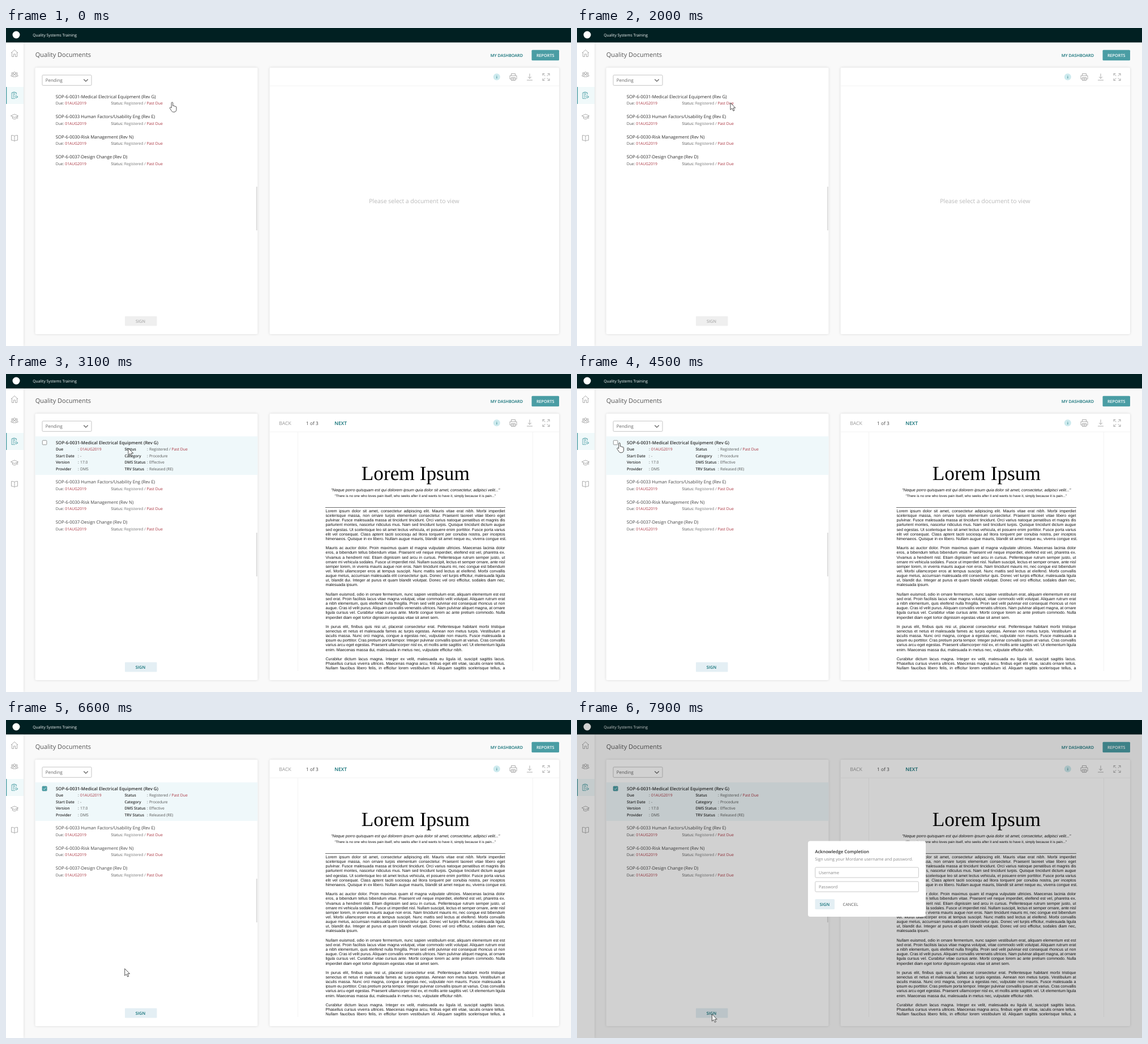
These frames come from a looping animation (998x561 px, 8000 ms). An HTML page:

```html
<!DOCTYPE html>
<html lang="en">
<head>
<meta charset="utf-8">
<title>Quality Documents</title>
<style>
  html, body { margin: 0; width: 100%; height: 100%; overflow: hidden; background: #f9f9f9; }
  svg { display: block; width: 998px; height: 561px; }
  text { font-family: "Open Sans", sans-serif; text-rendering: geometricPrecision; }
  .sans { font-family: "Liberation Sans", sans-serif; }
  .serif { font-family: "Liberation Serif", serif; }
  .card { fill: #fff; filter: drop-shadow(0 0 2px #0002); }
  .icon { fill: none; stroke: #999; stroke-width: .8; stroke-linejoin: round; }
</style>
</head>
<body>
<svg id="stage" viewBox="0 0 998 561"></svg>
<script>
const TEAL = '#4a9da4', DARK_TEAL = '#0d6e75', RED = '#a8323e', INK = '#2b2b2b', GREY = '#777';

// Text placed by its left edge and the middle of its capitals.
const text = (x, cy, size, fill, content, attrs = '') =>
  `<text x="${x}" y="${cy + size * .36}" font-size="${size}" fill="${fill}" ${attrs}>${content}</text>`;
const bold = (x, cy, size, fill, content, attrs = '') =>
  text(x, cy, size, fill, content, 'font-weight="600" ' + attrs);
const rect = (x, y, w, h, fill, attrs = '') =>
  `<rect x="${x}" y="${y}" width="${w}" height="${h}" fill="${fill}" ${attrs}/>`;
const span = (fill, content) => `<tspan fill="${fill}">${content}</tspan>`;
const icon = (x, y, d, attrs = '') =>
  `<path class="icon" transform="translate(${x} ${y})" d="${d}" ${attrs}/>`;
const group = (id, content) => `<g id="${id}">${content}</g>`;

const documents = [
  'SOP-6-0031-Medical Electrical Equipment (Rev G)',
  'SOP-6-0033 Human Factors/Usability Eng (Rev E)',
  'SOP-6-0030-Risk Management (Rev N)',
  'SOP-6-0037-Design Change (Rev D)'
];

const article = `Lorem ipsum dolor sit amet, consectetur adipiscing elit. Mauris vitae erat nibh. Morbi imperdiet
scelerisque massa, non ornare turpis elementum consectetur. Praesent laoreet vitae libero eget
pulvinar. Fusce malesuada massa at tincidunt tincidunt. Orci varius natoque penatibus et magnis dis
parturient montes, nascetur ridiculus mus. Nam sed tincidunt turpis. Quisque tincidunt dictum augue
sed egestas. Ut scelerisque leo sit amet lectus vehicula, et posuere enim porttitor. Fusce porta varius
elit vel consequat. Class aptent taciti sociosqu ad litora torquent per conubia nostra, per inceptos
himenaeos. Quisque in ex libero. Nullam augue mauris, blandit sit amet neque eu, viverra congue est.

Mauris ac auctor dolor. Proin maximus quam id magna vulputate ultricies. Maecenas lacinia dolor
eros, a bibendum tellus bibendum vitae. Praesent vel neque imperdiet, eleifend est vel, pharetra ex.
Vivamus a hendrerit nisl. Etiam dignissim sed arcu in cursus. Pellentesque rutrum semper justo, ut
ornare mi vehicula sodales. Fusce ut imperdiet nisl. Nullam suscipit, lectus et semper ornare, ante nisl
semper lorem, in viverra mauris augue non eros. Nam tincidunt mauris mi, nec congue est bibendum
vel. Morbi ullamcorper eros at tempus suscipit. Nunc mattis sed lectus at eleifend. Morbi convallis
augue metus, accumsan malesuada elit consectetur quis. Donec vel turpis efficitur, malesuada ligula
ut, blandit dui. Integer at purus et quam blandit volutpat. Donec vel orci efficitur, sodales diam nec,
malesuada ipsum.

Nullam euismod, odio in ornare fermentum, nunc sapien vestibulum erat, aliquam elementum est est
sed erat. Proin facilisis lacus vitae magna volutpat, vitae commodo velit volutpat. Aliquam rutrum erat
a nibh elementum, quis eleifend nulla fringilla. Proin sed velit pulvinar est consequat rhoncus ut non
augue. Cras id velit purus. Aliquam convallis venenatis ultrices. Nam pulvinar aliquet magna, at ornare
ligula cursus vel. Curabitur vitae cursus ante. Morbi congue lorem ac ante pretium commodo. Nulla
imperdiet diam eget tortor dignissim egestas vitae sit amet sem.

In purus elit, finibus quis nisi ut, placerat consectetur erat. Pellentesque habitant morbi tristique
senectus et netus et malesuada fames ac turpis egestas. Aenean non metus turpis. Vestibulum at
iaculis massa. Nunc orci magna, congue a egestas nec, vulputate non mauris. Fusce malesuada a
ipsum eu porttitor. Cras pretium porta tempor. Integer pulvinar convallis ipsum at varius. Cras convallis
varius arcu eget egestas. Praesent ullamcorper nisl ex, et mollis ante sagittis vel. Ut elementum ligula
enim. Maecenas massa dui, malesuada in metus nec, vulputate efficitur nibh.

Curabitur dictum lacus magna. Integer ex velit, malesuada eu ligula id, suscipit sagittis lacus.
Phasellus cursus viverra ultrices. Maecenas magna arcu, finibus eget elit vitae, iaculis ornare tellus.
Nullam faucibus libero felis, in efficitur lorem vestibulum id. Aliquam sagittis scelerisque tellus, a`.

split('\n');

const row = (title, cy, ink) =>
  text(87.7, cy, 7.82, ink, title) +
  text(87.7, cy + 12, 6.82, '#555', 'Due: ' + span(RED, '01AUG2019')) +
  text(185.4, cy + 12, 6.82, '#555', `Status: ${span(GREY, 'Registered /')} ${span(RED, 'Past Due')}`);
const rows = (titles, top, ink) => titles.map((title, i) => row(title, top + i * 35.45, ink)).join('');

const field = (x, colonX, cy, label, value) =>
  bold(x, cy, 6.75, INK, label) + text(colonX, cy, 6.8, INK, ':') + text(colonX + 4, cy, 6.8, '#555', value);

const chrome = () =>
  rect(0, 25, 31, 536, '#fff', 'class="card"') +
  rect(0, 0, 998, 25.5, '#012022') +
  '<circle cx="18" cy="12" r="6.5" fill="#fff"/>' +
  text(47.3, 12.5, 6.8, '#fff', 'Quality Systems Training') +
  rect(0, 104, 31, 30, '#f0f9fa') + rect(0, 104, 1.3, 30, TEAL) +
  icon(9, 38, 'M0 6 6 .5 12 6M1.5 5V12.5H4.5V8H7.5V12.5H10.5V5') +
  icon(9, 77, 'M4 2.5a2 2 0 1 0 4 0a2 2 0 1 0-4 0M3 9V7.5Q3 5.5 6 5.5T9 7.5V9ZM.8 3a1.4 1.4 0 1 0 2.8 0a1.4 1.4 0 1 0-2.8 0M8.4 3a1.4 1.4 0 1 0 2.8 0a1.4 1.4 0 1 0-2.8 0M3 8H0V7Q0 5 2.8 5M9 8H12V7Q12 5 9.2 5') +
  icon(9, 112.5, 'M7 12H1V1.5H3.5M7 1.5H9.5V5M3.5 .5H7V2.7H3.5ZM3 5H7.5M3 7.3H6M3 9.6H5.5M6.5 9 9 6.5V8H11.5V10H9V11.5Z', `style="stroke:${TEAL}"`) +
  icon(8.5, 151, 'M0 4 6.5 1 13 4 6.5 7ZM3 5.5V8.7Q6.5 11 10 8.7V5.5M12 4.5V9') +
  icon(9, 188.5, 'M6 2Q4 .5 .5 .8V9.5Q4 9.3 6 11Q8 9.3 11.5 9.5V.8Q8 .5 6 2V11') +
  text(51.8, 47, 11, '#555', 'Quality Documents') +
  bold(855.7, 48, 7.25, DARK_TEAL, 'MY DASHBOARD') +
  rect(928.5, 38.7, 48.5, 18.6, TEAL, 'rx="1.5"') +
  bold(952.7, 48, 7.25, '#fff', 'REPORTS', 'text-anchor="middle"') +
  rect(51.5, 70, 393, 470, '#fff', 'class="card" rx="2"') +
  rect(465.5, 70, 511.5, 470, '#fff', 'class="card" rx="2"') +
  rect(466, 101.7, 511, .7, '#eee') +
  rect(64, 83, 87, 18.3, '#fff', 'stroke="#b5b5b5" stroke-width=".8" rx="1.5"') +
  text(69.8, 92.3, 7.9, '#666', 'Pending') +
  icon(137, 90, 'M.3 .5 4 4.2 7.7 .5', 'style="stroke:#555;stroke-width:1.1"') +
  rect(442.3, 280, 1.2, 77, '#c9c9c9') +
  '<circle cx="866.8" cy="86.3" r="6" fill="#cdeaee"/>' +
  bold(866.8, 86.3, 6.5, DARK_TEAL, 'i', 'text-anchor="middle"') +
  icon(889.5, 80, 'M3 4V.5H10V4M3 10H.5V4H12.5V10H10M3 7.3H10V12.5H3ZM4.5 9H8.5M4.5 10.8H8.5') +
  icon(919.5, 80, 'M5.5 .5V9M2.5 6.2 5.5 9 8.5 6.2M.5 12H10.5') +
  icon(947.5, 80, 'M5 5 .5 .5M.5 4V.5H4M8 5 12.5 .5M9 .5H12.5V4M5 8 .5 12.5M.5 9V12.5H4M8 8 12.5 12.5M9 12.5H12.5V9');

const emptyView = () =>
  rows(documents, 121, INK) +
  rect(210, 508.5, 56.5, 17, '#efefef', 'rx="1"') +
  text(237.5, 517, 7.3, '#999', 'SIGN', 'text-anchor="middle"') +
  text(721, 305, 10.4, '#b8b8b8', 'Please select a document to view', 'text-anchor="middle"');

const openView = () =>
  rect(51.5, 110, 393, 68, '#eff8fa') +
  rect(64.3, 117.2, 7.6, 7.6, '#fff', 'stroke="#888" stroke-width=".9" rx="1"') +
  group('checked', rect(63.8, 116.7, 8.6, 8.6, TEAL, 'rx="1"') +
    icon(65.5, 118.5, 'M.5 2.7 2 4.3 5 .9', 'style="stroke:#fff"')) +
  bold(88, 121, 7.78, INK, documents[0]) +
  field(88, 127, 133, 'Due', span(RED, '01AUG2019')) +
  field(88, 127, 144.5, 'Start Date', '-') +
  field(88, 127, 156, 'Version', '17.0') +
  field(88, 127, 167.5, 'Provider', 'DMS') +
  field(209.4, 249, 133, 'Status', 'Registered / ' + span(RED, 'Past Due')) +
  field(209.4, 249, 144.5, 'Category', 'Procedure') +
  field(209.4, 249, 156, 'DMS Status', 'Effective') +
  field(209.4, 249, 167.5, 'TRV Status', 'Released (RE)') +
  rows(documents.slice(1), 190.3, '#444') +
  rect(210, 508.5, 56.5, 17, '#e4eff4', 'rx="1"') +
  bold(237.5, 517, 7.3, DARK_TEAL, 'SIGN', 'text-anchor="middle"') +
  text(482.3, 87, 8.7, '#999', 'BACK') +
  text(530, 87, 8.3, '#444', '1 of 3') +
  bold(580.3, 87, 8.6, DARK_TEAL, 'NEXT') +
  rect(515, 102, .8, 422, '#f1f1f1') + rect(930, 102, .8, 422, '#f1f1f1') +
  text(723.3, 174.3, 35.3, '#000', 'Lorem Ipsum', 'class="serif" text-anchor="middle"') +
  text(723.3, 204, 7.14, '#111', '"Neque porro quisquam est qui dolorem ipsum quia dolor sit amet, consectetur, adipisci velit..."',
    'class="sans" font-style="italic" text-anchor="middle"') +
  text(722.8, 214.6, 6.11, '#111', '"There is no one who loves pain itself, who seeks after it and wants to have it, simply because it is pain..."',
    'class="sans" text-anchor="middle"') +
  rect(564, 235, 318, .8, '#444') +
  article.map((line, i) => text(564.5, 241.4 + i * 8.156, 7.1, '#111', line, 'class="sans line"')).join('');

const input = (y, label) =>
  rect(420.8, y, 182.5, 18, '#fff', 'stroke="#bbb" stroke-width=".8" rx="1.5"') +
  text(427, y + 9, 7.45, '#888', label);

const dialog = () =>
  rect(0, 0, 998, 561, '#000', 'opacity=".18"') +
  rect(408, 213.5, 208, 133.5, '#fff', 'rx="4"') +
  bold(420.5, 232, 7.8, INK, 'Acknowledge Completion') +
  text(420.5, 245.5, 7.3, '#888', 'Sign using your Mordane username and password.') +
  input(260, 'Username') + input(285, 'Password') +
  rect(420.5, 316, 34.5, 18, '#e4eff4', 'rx="1.5"') +
  bold(437.5, 325, 7.3, DARK_TEAL, 'SIGN', 'text-anchor="middle"') +
  text(469.6, 325, 7.3, '#555', 'CANCEL');

const cursor = (id, d) => `<path id="${id}" d="${d}" fill="#fff" stroke="#333" stroke-width=".85" stroke-linejoin="round"/>`;

const $ = id => document.getElementById(id);
$('stage').innerHTML = chrome() + group('empty', emptyView()) + group('open', openView()) + group('dialog', dialog()) +
  cursor('arrow', 'M0 0V12.3L2.9 9.7 5 14.3 7 13.4 5 9H8.8Z') +
  cursor('hand', 'M3.2 10.5V1.8C3.2 0 5.8 0 5.8 1.8V7C6 6 8 6.2 8 7.6 8.4 6.6 10 7 10 8.3 10.6 7.6 12 8 12 9.2V13C12 16 10.5 17.7 8 17.7H6.6C4.8 17.7 4 16.8 3 15L.4 11.2C-.3 9.8 1.4 8.8 2.4 9.8Z');

// Justify every line that does not end a paragraph.
document.querySelectorAll('.line').forEach((line, i) => {
  if (article[i] && article[i + 1] !== '')
    line.style.wordSpacing = (317 - line.getComputedTextLength()) / (article[i].split(' ').length - 1) + 'px';
});

const show = (id, visible) => $(id).style.display = visible ? '' : 'none';
const progress = (t, from, to) => Math.min(1, Math.max(0, (t - from) / (to - from)));
const mix = (a, b, p) => a + (b - a) * p;

function pointer(t) {
  if (t < 1000) return ['hand', 289, 130.5];
  if (t < 4000) {
    const p = 1 - (1 - progress(t, 3000, 3900)) ** 2.85;
    return ['arrow', mix(271, 78, p), mix(132, 118, p * p)];
  }
  if (t < 4500) return ['hand', 72.5, 120];
  if (t < 4600) return ['hand', 70.5, 121];
  if (t < 7800) {
    const u = progress(t, 5000, 7300) ** .9, p = u * u * (3 - 2 * u);
    return ['arrow', mix(72, 242, p), mix(121, 513, p)];
  }
  return t < 7900 ? ['hand', 239, 518] : ['arrow', 238.5, 519];
}

function draw(now) {
  const t = Math.floor(now % 8000 / 100) * 100;
  show('empty', t < 2100);
  show('open', t >= 2100);
  show('checked', t >= 4600);
  show('dialog', t >= 7900);
  const [kind, x, y] = pointer(t);
  show('arrow', kind === 'arrow');
  show('hand', kind === 'hand');
  $(kind).setAttribute('transform', `translate(${x} ${y})`);
  requestAnimationFrame(draw);
}
draw(performance.now());
</script>
</body>
</html>
```
